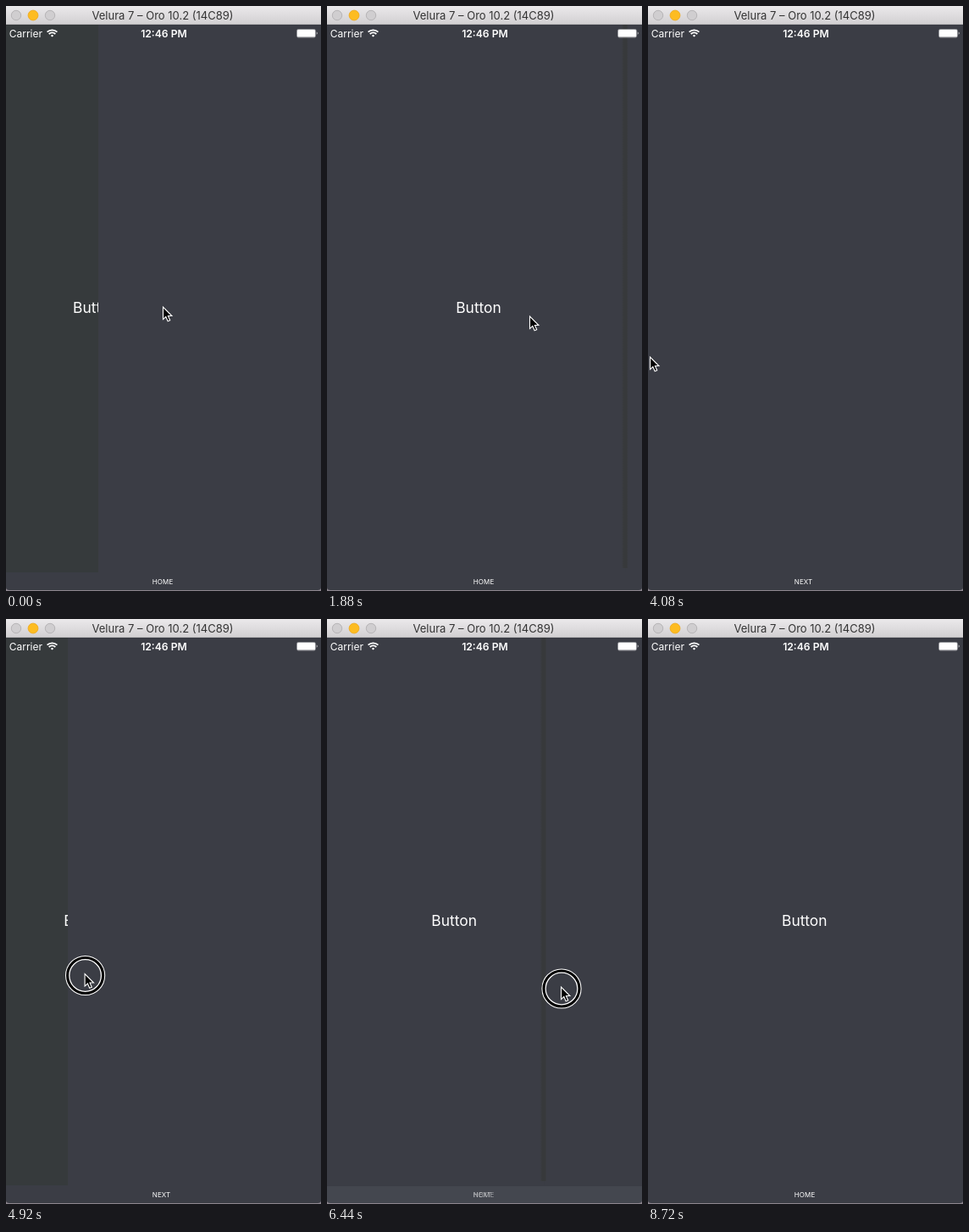
An HTML page that plays this animation: 372 by 690 pixels, repeating every 9.2 s.

```html
<!DOCTYPE html>
<html lang="en">
<head>
<meta charset="utf-8">
<title>Swipe back</title>
<style>
  html, body { margin: 0; width: 100%; height: 100%; overflow: hidden; background: #3b3d45; }
  svg { display: block; width: 372px; height: 690px; font-family: Inter, Roboto, sans-serif; }
  text { fill: #fff; }
  .small { font-size: 8px; letter-spacing: .1px; }
</style>
</head>
<body>
<svg viewBox="0 0 372 690">
  <defs>
    <linearGradient id="chrome" x2="0" y2="1">
      <stop stop-color="#ebe9eb"/><stop offset="1" stop-color="#d1cfd1"/>
    </linearGradient>
    <linearGradient id="edge">
      <stop stop-color="#37393b" stop-opacity="0"/>
      <stop offset=".35" stop-color="#37393b"/>
      <stop offset=".75" stop-color="#37393b"/>
      <stop offset="1" stop-color="#37393b" stop-opacity="0"/>
    </linearGradient>
  </defs>

  <rect width="372" height="690" fill="#3b3d45"/>
  <rect id="dim" y="22" height="646" fill="#363a3c"/>
  <text id="button" y="362" font-size="17.4">Button</text>
  <rect id="cover" y="22" width="372" height="668" fill="#3b3d45"/>
  <rect id="shadow" y="22" width="8" height="641" fill="url(#edge)"/>

  <rect y="668" width="372" height="22" fill="#3b3d45"/>
  <rect id="flash" y="669" width="372" height="20" fill="#44474f"/>
  <text id="home" class="small" x="172.8" y="682">HOME</text>
  <text id="next" class="small" x="172.8" y="682">NEXT</text>
  <path d="M0 686Q0 689 4 689H368Q372 689 372 686V690H0Z" fill="#8f8790"/>

  <rect width="372" height="22" fill="url(#chrome)"/>
  <rect y="21" width="372" height="1" fill="#b9b7b9"/>
  <g fill="#d0ced0" stroke="#b7b5b7">
    <circle cx="12" cy="11" r="5.7"/>
    <circle cx="32" cy="11" r="5.9" fill="#fdbc21" stroke="#f0ae25"/>
    <circle cx="52" cy="11" r="5.7"/>
  </g>
  <text x="185" y="16" font-size="13" text-anchor="middle" style="fill:#333">Velura 7 – Oro 10.2 (14C89)</text>

  <text x="3.7" y="36.5" font-size="12">Carrier</text>
  <g fill="none" stroke="#fff" stroke-width="1.8">
    <path d="M48.6 30.7A8.4 8.4 0 0 1 60.4 30.7"/>
    <path d="M50.7 33A5.4 5.4 0 0 1 58.3 33"/>
    <path d="M54.5 36.6L52.8 34.9A2.4 2.4 0 0 1 56.2 34.9Z" fill="#fff" stroke="none"/>
  </g>
  <text x="186.5" y="36.5" font-size="12.2" font-weight="600" text-anchor="middle">12:46 PM</text>
  <rect x="343.5" y="27.5" width="22" height="9.5" rx="1.8" fill="none" stroke="#fff" stroke-opacity=".45"/>
  <rect x="344" y="28" width="21" height="8.5" rx="1" fill="#fff"/>
  <path d="M366.8 30.2Q368.6 32 366.8 34Z" fill="#fff"/>

  <g id="pointer">
    <g id="ring" fill="none">
      <circle cy="2" r="20.9" stroke="#fff" stroke-width="5.4"/>
      <circle cy="2" r="21" stroke="#000" stroke-width="3.1"/>
    </g>
    <path d="M-.5 0V14.6L2.8 11.5L5.1 16.8L7.7 15.7L5.4 10.5H9.9Z" fill="#000" stroke="#fff" stroke-width="1.1"/>
  </g>
</svg>
<script>
const LOOP = 9200, STEP = 40, WIDTH = 372, GRIP = 20.5;
const $ = id => document.getElementById(id);
const clamp = v => Math.min(1, Math.max(0, v));

const linear = u => u;
const smooth = u => u * u * (3 - 2 * u);
const out = u => 1 - (1 - u) ** 3;

// Each row: time, values..., easing towards this row
const pointer = [
  [0, 186, 355, linear],
  [40, 186, 355, linear],
  [960, 6, 361, smooth],
  [1360, 6, 361, linear],
  [1720, 240, 366, smooth],
  [2360, 240, 366, linear],
  [2720, 206, 364, out],
  [2960, 205, 364, linear],
  [3560, 5, 404, smooth],
  [3720, 5, 404, linear],
  [4080, 3, 414, out],
  [4400, 3, 414, linear],
  [5560, 205, 424, linear],
  [6440, 277, 434, linear],
  [6840, 310, 438, out],
  [7240, 310, 438, linear],
  [7760, 384, 430, smooth]
];

const slides = [
  [0, 109, linear],
  [320, 0, out],
  [1720, 0, linear],
  [1721, 219.5, linear],
  [2040, WIDTH, out],
  [2840, WIDTH, linear],
  [3280, 0, out],
  [6840, 0, linear],
  [6841, 289.5, linear],
  [7240, WIDTH, out]
];

const drags = [[1360, 1720], [4400, 6840]];
const presses = [...drags, [2760, 2880]];
const homeSpans = [[0, 320], [2040, 3320], [7240, LOOP]];
const popSpans = [[1360, 2040], [4400, 7240]];
const inside = (spans, t) => spans.some(([a, b]) => t >= a && t < b);

function sample(rows, t) {
  const i = rows.findIndex(r => r[0] > t);
  if (i < 0) return rows.at(-1).slice(1, -1);
  const a = rows[i - 1], b = rows[i];
  const u = b.at(-1)((t - a[0]) / (b[0] - a[0]));
  return a.slice(1, -1).map((v, k) => v + (b[k + 1] - v) * u);
}

function set(id, attrs) {
  for (const key in attrs) $(id).setAttribute(key, attrs[key]);
}

function draw(t) {
  const [px, py] = sample(pointer, t);
  const edge = inside(drags, t) ? Math.max(0, px - GRIP) : sample(slides, t)[0];
  const popping = inside(popSpans, t);
  const home = popping ? clamp((edge - 200) / 113) : +inside(homeSpans, t);

  set("button", { x: 158 - (WIDTH - edge) * 0.3 });
  set("cover", { x: edge });
  set("dim", { width: edge, opacity: clamp((170 - edge) / 50) });
  set("shadow", { x: edge - 5, opacity: clamp((edge - 190) / 60) * (edge < WIDTH) });
  set("home", { opacity: home });
  set("next", { opacity: 1 - home });
  set("flash", { opacity: 4 * home * (1 - home) });
  set("pointer", { transform: `translate(${px.toFixed(1)} ${py.toFixed(1)})` });
  set("ring", { opacity: +inside(presses, t) });
}

const start = performance.now();
function tick() {
  const t = (performance.now() - start) % LOOP;
  draw(Math.floor(t / STEP) * STEP);
  requestAnimationFrame(tick);
}
tick();
</script>
</body>
</html>
```
